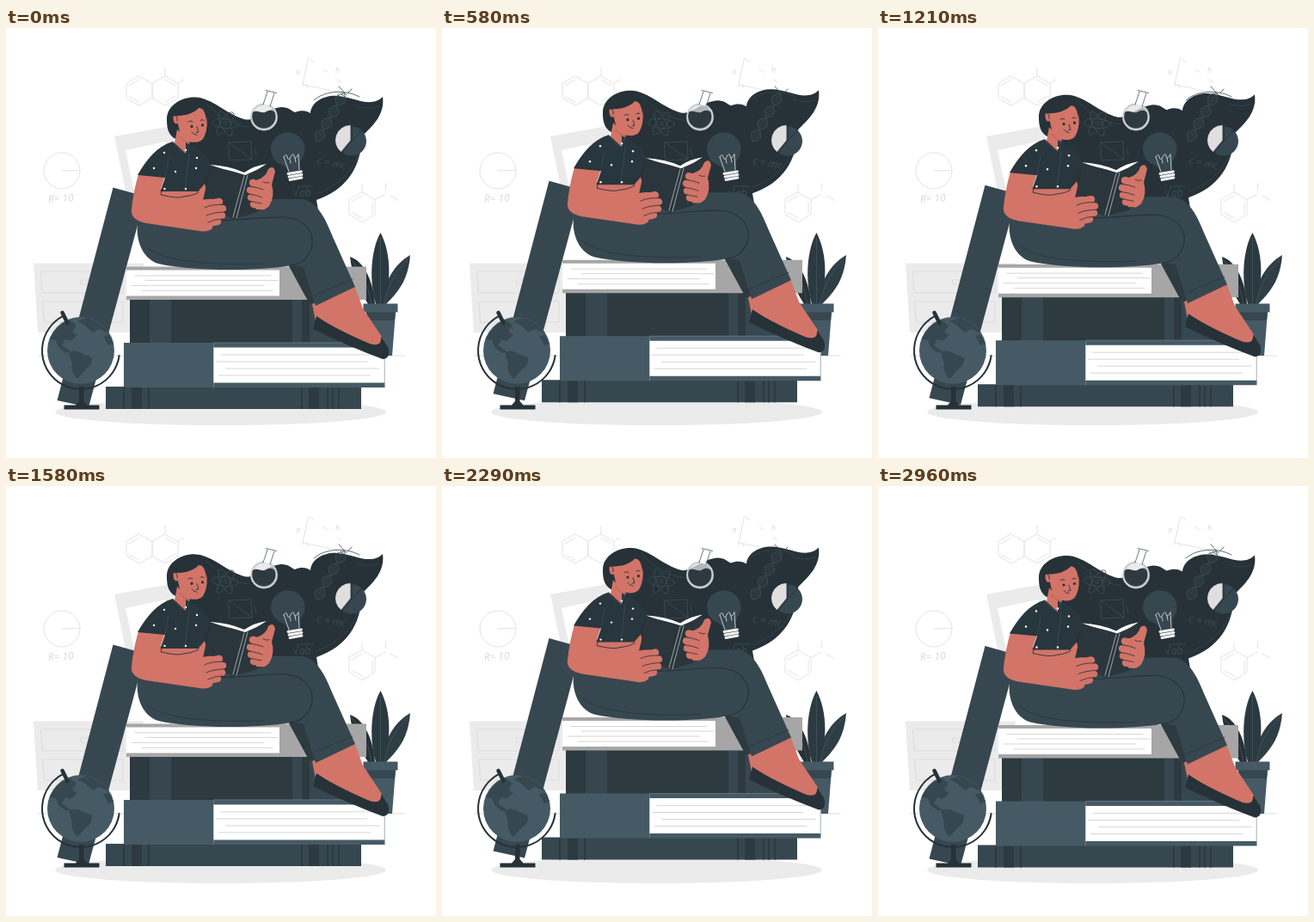
These frames come from a looping animation (500x500 px, 3 s). An HTML page:

```html
<!DOCTYPE html>
<html lang="en">
<head>
<meta charset="utf-8">
<title>Reading on books</title>
<style>
  html, body { margin: 0; width: 100%; height: 100%; overflow: hidden; background: #fff; }
  svg { display: block; width: 100vw; height: 100vh; }
  .line { fill: none; stroke-linecap: round; stroke-linejoin: round; }
  .faint { stroke: #e3e3e3; }
  .chalk { stroke: #3d4e56; stroke-width: .8; }
  .ink { stroke: #263238; }
  .night { fill: #263238; }
  .dusk { fill: #2d3a40; }
  .slate { fill: #37474f; }
  .steel { fill: #455a64; }
  .pale { fill: #ebebeb; }
  .grey { fill: #a6a6a6; }
  .skin { fill: #d27468; }
  .finger { stroke: #d27468; stroke-width: 8.500; }
  text { font: italic 12px "Open Sans", sans-serif; }
  .small { font-size: 9px; }
</style>
</head>
<body>
<svg viewBox="0 0 500 500">
  <ellipse class="pale" cx="249.500" cy="446.500" rx="192.500" ry="15.500"/>
  <path class="line" stroke="#d5d5d5" stroke-width=".8" d="M38 381H463"/>

  <!-- Wall: drawers, frame, formulas -->
  <path class="pale" d="M32 273.500H160V354H37z"/>
  <path class="line" stroke="#dcdcdc" d="M41 283H136V308H42.500zM43 318H136V342H45zM87 293h10v5H87z"/>
  <path class="pale" d="M126 126L192 114 215 200H141z"/>
  <path fill="#fff" d="M139 142L186 132 200 190H149z"/>
  <g class="line faint">
    <circle cx="65" cy="166" r="21"/>
    <path d="M65 166L84 165.500"/>
    <path d="M155 56l15 8.500v17L155 90l-15-8.500v-17zM185 56l15 8.500v17L185 90l-15-8.500v-17zM185 46v10M200 64.500l7-4.500M155 60l-12 7M143 80l12 6M185 60l12 7M197 79l-12 7"/>
    <path d="M414 191l15 8.500v17L414 226l-15-9.500v-17zM414 182v9M429 199.500l12-6M441.500 188v-7M447 195l9 5.500M414 195l-12 7M402 214l12 7M426 203v12"/>
    <path d="M351.500 35L344.500 68M345 66L397 76.500M350 66v4"/>
    <path stroke-dasharray="6 14" d="M353 36L402 72"/>
  </g>
  <g fill="#d9d9d9">
    <text x="49" y="203" transform="rotate(-3 49 203)">R= 10</text>
    <text class="small" x="337" y="54">a</text>
    <text class="small" x="383" y="52">h</text>
  </g>

  <!-- Plant -->
  <path class="night" d="M400 266C416 271 427 294 429 321H421C409 302 402 286 400 266z"/>
  <path fill="#2f3e45" d="M470 264C451 275 439 296 437 321H442C459 304 468 290 470 264z"/>
  <path fill="#2b3a41" d="M435.500 238C424 258 422 295 430 321H439C448 295 448 262 435.500 238z"/>
  <path class="line" stroke="#47585f" stroke-width=".7" d="M435.500 244V320M467 269Q444 292 440 320M402 270Q420 291 425 320"/>
  <path class="steel" d="M419 330H453L449 381H423z"/>
  <path class="slate" d="M419 330H453L452 340H420z"/>
  <path class="steel" d="M415.500 320.500h40v10h-40z"/>

  <g class="float">
    <path class="slate" d="M124.500 185.500L162 196 96 441 59.500 433z"/>
    <!-- Book pile -->
    <path class="slate" d="M116 417H413V443H116z"/>
    <path class="dusk" d="M136 418h2v25h-2zM146 418h12v25h-12zM165 418h2v25h-2zM343 418h2v25h-2zM352 418h12v25h-12zM373 418h2v25h-2zM379 418h2v25h-2zM386 418h2v25h-2z"/>
    <path class="dusk" d="M144 315H398V367H144z"/>
    <path class="slate" d="M167 316h25v51h-25zM333 316h11v51h-11zM353 316h45v51h-45z"/>
    <path class="steel" d="M137 366H440.500V418H137z"/>
    <path fill="#fff" d="M241 371.500H440.500V412.500H241z"/>
    <path class="line" stroke="#8d999f" stroke-width=".5" d="M241.500 418V366H440V418"/>
    <path class="grey" d="M140 277.500H419V316H140z"/>
    <path fill="#fff" d="M140 281.500H318V311.500H140z"/>
    <path class="line" stroke="#c4c4c4" stroke-width=".7" d="M150 288H308M162 293.500H316M146 299.500H300M158 305.500H310M250 380H428M244 388H420M256 396H434M247 404H424"/>
    <!-- Hair -->
    <path class="night" d="M197 129C188 124 187 115 187 106C187 90 204 80 220 80.500C240 81 258 102 279 106.500C290 108 301 94 320 92C329 92 331 96 336 98C343 95 350 96 354 99C355 86 370 78 385 79C404 80 424 94 438 80C441 101 426 114 414 126C413 162 396 188 361 200L363 212H225L205 135z"/>
    <path class="line" stroke="#394a52" stroke-width=".7" d="M232 88C249 102 260 113 282 115M361 193C389 183 407 163 411 140M408 91Q424 96 434 91"/>
  </g>

  <!-- Floating study icons -->
  <g class="line chalk">
    <g id="atom"></g>
    <path d="M259 133L285 132 286 153 260 154zM259 133L286 153M289 140l2 8"/>
    <path id="dna"/>
    <path stroke="#37474f" d="M358 84C370 73 394 71 411 80M387 68L396 78M398 75l4-4"/>
    <path d="M334 189l3 7 3-12h17"/>
  </g>
  <g fill="#3d4e56">
    <text x="361" y="158" transform="rotate(10 361 158)">c = mc</text>
    <text x="341" y="196">ab</text>
  </g>
  <circle cx="300" cy="103.500" r="14.800" fill="#e4e4e4" fill-opacity=".75" stroke="#c9cdcf" stroke-width="2.200"/>
  <path class="dusk" d="M287 98C292 94 298 101 303 97Q309 94 312.500 98C316 109 308 116.500 300 116.500C290 116.500 284 107 287 98z"/>
  <path fill="#fff" fill-opacity=".8" d="M304 74L312 76 307 91 299 89z"/>
  <path class="line" stroke="#455a64" stroke-width=".8" d="M302 72.500L314.500 75.500M304 74L299 89M312 76L307 91"/>
  <path class="slate" d="M328 121.500a19.500 19.500 0 0 1 17 29Q341 157 342 166L328 168Q326 160 318 158A19.500 19.500 0 0 1 328 121.500z"/>
  <path class="line" stroke="#e8e8e8" stroke-width=".8" d="M323 150L329 167M340 147L341 165M323 150q3-5 4 0t4 0q3-6 4-1t5-2M330 152l1 5M336 151l1 5"/>
  <path class="line" stroke="#f3f3f3" stroke-width="2.800" stroke-linecap="butt" d="M328 169.500L343.500 167M329 173L344 170.500M330 176.500L344 174"/>
  <circle class="slate" cx="402" cy="131.500" r="17"/>
  <path fill="#e0dede" d="M400.500 130.500V113A17.500 17.500 0 0 0 389.500 144.100z"/>
  <path class="line ink" d="M402 114V131L391 145M402 131L414 119"/>

  <g class="float">
    <!-- Legs -->
    <path class="skin" d="M356 321L405 299 415 326 437 359 433 373 400 365 360 341z"/>
    <path class="night" d="M361 335C380 348 402 358 424 367.500C434 370 437 366 436 359L444 371C447 380 444 385 438 385Q400 371 357 350z"/>
    <path class="dusk" d="M328 275L346 272 374 316 353 321z"/>
    <path class="slate" d="M154 222C149 244 158 268 177 274C215 283 292 283 332 276L346 278 360 323 406 301 380 243C372 223 362 201 344 199L300 199 240 215z"/>
    <path class="line ink" stroke-width="1.100" d="M232 224C270 225 300 219 325 220C346 222 358 236 356 252C353 268 342 275 331 276"/>
    <path class="line ink" stroke-width=".7" d="M358 311L403 292M163 255C185 273 240 276 300 274"/>
    <!-- Head -->
    <path class="skin" d="M199 118L195 139 209 149 214 132z"/>
    <path class="skin" d="M197 100C210 99 219 95 228 89C235 100 236 118 229 129C223 136 208 133 203 125L200 112z"/>
    <ellipse class="skin" cx="198" cy="105" rx="3.500" ry="6.500"/>
    <path class="night" d="M193 102C205 103 218 100 224 93C230 93 232 99 233 108C235 95 230 85 219 82C203 84 194 92 193 102z"/>
    <path class="line ink" stroke-width=".9" d="M212 109q3-2 5 0M226 107.500q2-2 4 0M222 115l2 6-3 .5M216 121q2 3 6 3.500M197 102q3 2 2 6"/>
    <circle class="night" cx="216" cy="114.500" r="1.600"/>
    <circle class="night" cx="228.500" cy="113" r="1.600"/>
    <path class="line" stroke="#b95c52" d="M202 126q5 7 11 7"/>
    <!-- Arm and shirt -->
    <path class="skin" d="M154 170L185 172 180 187H226L231 181 236 199 242 206 240 233Q234 238 225 236L163 227C149 224 145 218 146 211Q148 190 154 170z"/>
    <path fill="#28363d" d="M194 132C175 138 164 152 153 171L185 174 179.500 190 224 190 238 161Q234 145 220 139L209 133 209 146z"/>
    <path class="line" stroke="#43545d" stroke-width=".6" d="M185 173L189 152M194 133Q201 143 209 146L213 134M213 146L208 190"/>
    <g id="dots" fill="#fff"></g>
    <path class="line ink" stroke-width=".9" d="M181 190L180 194Q200 199 207 196 218 195 224 191"/>
    <!-- Open book -->
    <path fill="#fff" d="M237 159Q259 160 277 168 289 160 303 158L279 173z"/>
    <path fill="#2a363c" d="M238 161Q260 165 278 171L303 160 304 205 290 215 264 222 228 205z"/>
    <path class="line" stroke="#cfd4d6" stroke-width=".7" d="M277 172L264 220M281 171L268 221"/>
    <!-- Hands -->
    <path class="skin" d="M222 203Q230 198 242 199L244 228 225 234z"/>
    <path class="line finger" d="M234 205L248 202M234 212L252 210M234 220L251 218M232 228L246 225"/>
    <path class="line ink" stroke-width=".8" d="M251 205.500Q239 205 231 209M255 214Q242 214 233 218M252 222Q243 222 235 226"/>
    <path class="skin" d="M291 177Q302 174 305 164Q311 159 313 167L309 182Q313 196 306 207Q302 212 291 211z"/>
    <path class="line finger" d="M287 180L300 184M284 188.500L300 192M285 197L300 200M288 205L299 207"/>
    <path class="line ink" stroke-width=".8" d="M282 184Q292 185 299 188M281 193Q291 194 298 197M284 201.500Q291 203 297 204M299 179Q302 181 306 180"/>
  </g>

  <!-- Globe -->
  <path class="night" d="M85 417h5.500v17l4 4.500H108.500v5H67.500v-5H81l4-4.500z"/>
  <circle class="steel" cx="87" cy="375" r="39"/>
  <path class="slate" d="M51 362Q60 343 75 340L82 346 77 353 83 357 75 364 69 362 65 369 75 376 70 378 61 371 58 363zM73 377Q82 373 89 379L100 383Q101 392 93 397L83 408Q75 400 77 391zM83 341L94 337Q112 342 120 355L108 350 101 354 92 346zM113 358l7-1 5 10-6 2z"/>
  <path class="line ink" stroke-width="2" d="M66 335.200A45 45 0 1 0 131.600 381"/>
  <path class="line ink" stroke-width="4.500" stroke-linecap="butt" d="M65.500 331L71.500 343"/>
</svg>
<script>
  const $ = id => document.getElementById(id);
  $('atom').innerHTML = [5, 65, 125].map(a =>
    `<ellipse cx="255" cy="111" rx="15.500" ry="5.500" transform="rotate(${a} 255 111)"/>`).join('')
    + '<circle cx="255" cy="111" r="2"/>';

  const spots = [[184, 145], [172, 163], [197, 167], [209, 142], [221, 163], [184.500, 187], [209, 187], [222, 151]];
  $('dots').innerHTML = spots.map(([x, y]) => `<circle cx="${x}" cy="${y}" r="1.200"/>`).join('');

  // Double helix along a slanted axis
  const helix = (s, side) => {
    const w = 6 * side * Math.sin(s * Math.PI * 4);
    return `${(361 + 32 * s + w * .85).toFixed(1)} ${(132 - 56 * s + w * .5).toFixed(1)}`;
  };
  let dna = '';
  for (const side of [-1, 1])
    for (let i = 0; i <= 48; i++) dna += (i ? 'L' : 'M') + helix(i / 48, side);
  for (let i = 0; i < 24; i++) dna += `M${helix(i / 24, -1)}L${helix(i / 24, 1)}`;
  $('dna').setAttribute('d', dna);

  // Linear bob: 10 px up and back every 1.5 s
  const floats = document.querySelectorAll('.float');
  function draw() {
    const p = (performance.now() + 40) % 1500 / 750;
    const y = .5 - 10 * (1 - Math.abs(1 - p));
    floats.forEach(g => g.setAttribute('transform', `translate(0 ${y.toFixed(2)})`));
    requestAnimationFrame(draw);
  }
  draw();
</script>
</body>
</html>
```
